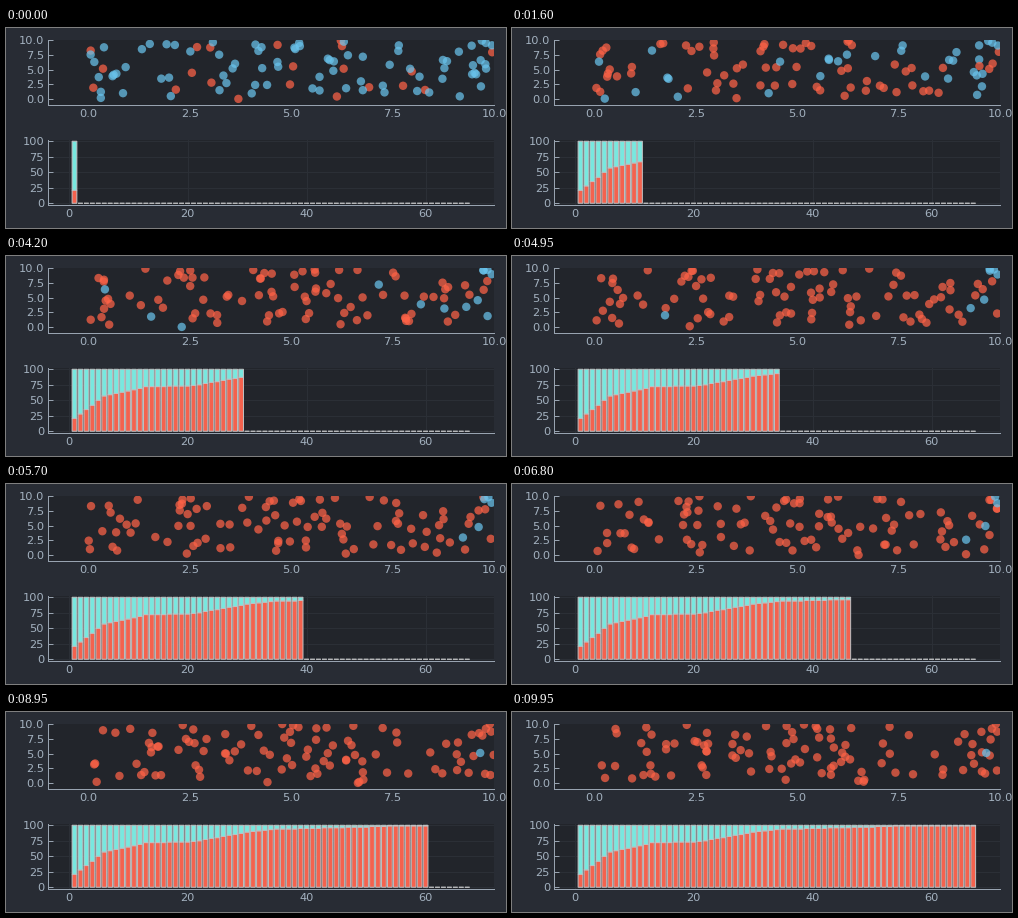
A matplotlib script that plays this animation: 500x200 px, repeating every 10000 ms.

```python
import numpy as np
import matplotlib.pyplot as plt
from matplotlib.animation import FuncAnimation
from matplotlib.colors import to_rgba

W, H, DPI = 500, 200, 100
FRAMES, STEP_MS, PER_BAR = 200, 50, 3
PX = 72 / DPI  # one pixel in points
PEOPLE, BARS, ROOM = 100, 67, 10

BACK, PANEL, GRID = "#282c34", "#22252b", "#2b2f36"
TEXT, LINE = "#a3b1bf", "#98a3b0"
SICK, WELL = to_rgba("#ff6347", 0.72), to_rgba("#69c3ec", 0.72)
BAR_SICK, BAR_WELL, BAR_EDGE = "#f4624e", "#78e8df", "#bfc0c2"

# Where the last healthy people start and end up.
LAST_START = [(0.85, 1.0), (9.7, 9.9), (9.8, 9.5), (9.95, 9.1),
              (9.46, 4.2), (9.56, 4.2)]
LAST_END = [(2.64, 3.0), (9.8, 9.2), (9.9, 10), (9.93, 8.7),
            (9.09, 2.2), (9.66, 5.1)]

# Bends of the infection curve, by bar.
BENDS = [1, 5, 6, 11, 13, 21, 30, 35, 54, 67]
LEVELS = [21, 50, 57, 67, 72, 74, 89, 94, 99, 99]


def infected(bar):
    return np.interp(bar, BENDS, LEVELS).astype(int)


def make_paths():
    """Drift with a slowly wandering speed, turning back at the walls."""
    rng = np.random.default_rng(7)
    crowd = PEOPLE - len(LAST_START)
    start = rng.uniform(0, ROOM, (crowd, 2))
    push = rng.normal(0, 0.001, (FRAMES, crowd, 2))
    push[0] = 0
    drift = start + push.cumsum(axis=0).cumsum(axis=0)
    drift = ROOM - np.abs(ROOM - np.abs(drift))

    ease = np.clip(np.arange(FRAMES) / 158, 0, 1)[:, None, None] ** 1.5
    first, last = np.array(LAST_START), np.array(LAST_END)
    return np.concatenate([drift, first + (last - first) * ease], axis=1)


def spread(paths):
    """First sick frame of each person; the nearest healthy one is next."""
    since = np.full(PEOPLE, FRAMES)
    since[:LEVELS[0]] = 0
    late = np.zeros(PEOPLE)
    late[-len(LAST_START):] = ROOM * np.arange(2, 2 + len(LAST_START))
    for n, place in enumerate(paths):
        gap = np.linalg.norm(place[:, None] - place, axis=2)
        while (since <= n).sum() < infected(1 + n / PER_BAR):
            sick = since <= n
            reach = gap[:, sick].min(axis=1) + late
            reach[sick] = np.inf
            since[reach.argmin()] = n
    return since


def add_panel(fig, top, xlim, ylim, xticks, yticks):
    ax = fig.add_axes([42 / W, 1 - (top + 65) / H, 446 / W, 65 / H],
                      facecolor=PANEL)
    ax.set(xlim=xlim, ylim=ylim, xticks=xticks, yticks=yticks)
    ax.tick_params(labelsize=11.4 * PX, labelcolor=TEXT, color=LINE,
                   direction="in", width=PX, pad=4 * PX)
    ax.tick_params(axis="x", length=0)
    ax.tick_params(axis="y", length=5 * PX)
    for side in ("top", "right"):
        ax.spines[side].set_visible(False)
    for side in ("left", "bottom"):
        ax.spines[side].set(color=LINE, linewidth=PX)
    return ax


plt.rcParams["font.family"] = "DejaVu Sans"
fig = plt.figure(figsize=(W / DPI, H / DPI), dpi=DPI, facecolor=BACK)
quarters = np.linspace(0, ROOM, 5)
room = add_panel(fig, 12, (-1, ROOM), (-1, ROOM), quarters, quarters)
room.xaxis.set_major_formatter("{x:.1f}")
room.yaxis.set_major_formatter("{x:.1f}")
chart = add_panel(fig, 112, (-3.45, 71.5), (-2.8, 102),
                  range(0, 61, 20), range(0, 101, 25))
chart.set_axisbelow(True)
chart.grid(color=GRID, lw=PX)

paths = make_paths()
sick_since = spread(paths)
counts = infected(np.arange(1, BARS + 1))
dots = room.scatter(*paths[0].T, s=(8.4 * PX) ** 2, linewidths=0)


def add_bars(color):
    return chart.bar(np.arange(1, BARS + 1), np.zeros(BARS), color=color,
                     edgecolor=BAR_EDGE, linewidth=PX, snap=False)


sick_bars = add_bars(BAR_SICK)
well_bars = add_bars(BAR_WELL)


def draw(n):
    dots.set_offsets(paths[n])
    dots.set_facecolors([SICK if s <= n else WELL for s in sick_since])
    shown = n // PER_BAR + 1
    for i, (low, high) in enumerate(zip(sick_bars, well_bars)):
        count, total = (counts[i], PEOPLE) if i < shown else (0, 0)
        low.set_height(count)
        high.set_y(count)
        high.set_height(total - count)
    return [dots, *sick_bars, *well_bars]


anim = FuncAnimation(fig, draw, frames=FRAMES, interval=STEP_MS,
                     repeat=True, repeat_delay=0)
plt.show()
```
